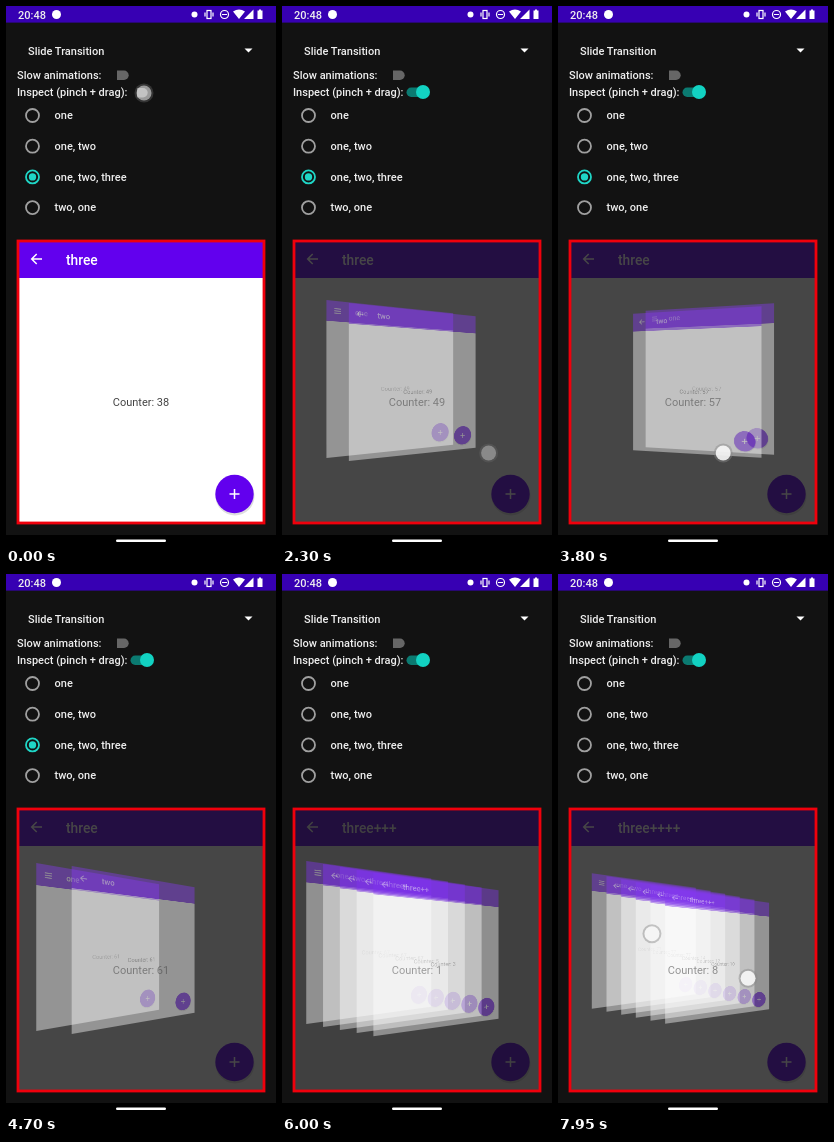
Recreate the animation shown at these times as an HTML page. Size 270x540 px, loop 8 s.

```html
<!DOCTYPE html>
<html lang="en">
<head>
<meta charset="utf-8">
<title>Slide Transition</title>
<style>
html, body { margin: 0; width: 100%; height: 100%; overflow: hidden; background: #121212; }
svg { position: absolute; left: 0; top: 0; font-family: Roboto, sans-serif; }
#clip { position: absolute; inset: 0; width: 270px; height: 540px; clip-path: inset(235px 12px 23px 12px); }
.screen { left: 12px; top: 235px; }
.ink { stroke: #fff; stroke-width: 1.5; fill: none; }
.title { fill: #fff; font-size: 13.75px; font-weight: 500; }
.count { font-size: 11px; text-anchor: middle; fill: #444; }
.label { font-size: 11px; font-weight: 500; fill: #eee; }
</style>
</head>
<body>
<svg id="chrome" width="270" height="540"></svg>
<div id="clip"></div>
<svg width="270" height="540">
  <rect x="12" y="235" width="246" height="282" fill="none" stroke="#f0000c" stroke-width="2.8"/>
  <g class="touch"><circle r="9.5" fill="#888" opacity=".45"/><circle r="7.5" fill="#fff" opacity=".85"/></g>
  <g class="touch"><circle r="9.5" fill="#888" opacity=".45"/><circle r="7.5" fill="#fff" opacity=".85"/></g>
</svg>
<script>
const LOOP = 8000, TICK = 205, W = 246, H = 282;
const OPEN = 250, OPEN_TIME = 550;
const PUSH = 4990, PUSH_GAP = 410, PUSH_TIME = 200, PUSH_COUNT = 4;
const PINCH = 6700, ZOOM = .525;
const DIM = .22, GHOST = .42;
const YAW = [[2300, 13.3], [3100, -29], [4650, 21.4], [5300, 17.5]];  // ms, degrees

const $ = s => document.querySelector(s);
const clamp = x => Math.min(1, Math.max(0, x));
const ramp = (t, a, b) => clamp((t - a) / (b - a));
const ease = x => x * x * (3 - 2 * x);
const easeOut = x => 1 - (1 - x) ** 2;
const mix = (a, b, k) => a + (b - a) * k;
const pushAt = i => PUSH + i * PUSH_GAP;

function yawAt(t) {
  return YAW.slice(1).reduce((yaw, [end, next], i) => mix(yaw, next, ease(ramp(t, YAW[i][0], end))), YAW[0][1]);
}

function addScreen(title, menu) {
  const icon = menu ? 'M13 14h11M13 18h11M13 22h11' : 'M24 18H14M18.7 13l-5 5 5 5';
  $('#clip').insertAdjacentHTML('beforeend', `<svg class="screen" width="${W}" height="${H}">
    <g class="body"><rect width="${W}" height="${H}" fill="#fff"/>
    <rect width="${W}" height="37" fill="#6200ee"/><path class="ink" d="${icon}"/>
    <text class="title" x="48" y="23.5">${title}</text>
    <circle cx="217" cy="255" r="19.5" fill="#000" opacity=".13"/>
    <circle cx="216.5" cy="253" r="19.2" fill="#6200ee"/>
    <path class="ink" d="M211.5 253h10M216.5 248v10"/></g>
    <text class="count" x="123" y="164.5"></text></svg>`);
  const el = $('#clip').lastElementChild;
  const [body, name, count] = ['.body', '.title', '.count'].map(s => el.querySelector(s));
  return { el, body, name, count };
}

const label = (x, y, s) => `<text class="label" x="${x}" y="${y}">${s}</text>`;
$('#chrome').innerHTML = `
  <rect width="270" height="16.600" fill="#3700b3"/>
  ${label(12, 12.5, '20:48')}
  <g fill="#fff"><circle cx="50.5" cy="8.5" r="4.5"/><circle cx="188.5" cy="8.5" r="3"/>
    <path d="M227 5.5q6-4 12 0l-6 7.5zM247.5 3.5v9.500h-9.500zM251.5 4.5h1.500v-1h2v1h1.500v8.500h-5z"/></g>
  <g fill="none" stroke="#fff" stroke-width="1.2"><rect x="201" y="4.5" width="4" height="8"/>
    <path d="M199 6.5v4M207 6.5v4M216 8.5h5"/><circle cx="218.5" cy="8.5" r="4"/></g>
  ${label(22, 48.5, 'Slide Transition')}
  <path d="M238.5 42.5h8l-4 4z" fill="#fff"/>
  ${label(11, 73, 'Slow animations:')}${label(11, 90, 'Inspect (pinch + drag):')}
  <path d="M111 64.5h7a4.7 4.7 0 0 1 0 9.4h-7z" fill="#666"/>
  <path id="off" d="M131 82h6a4.7 4.7 0 0 1 0 9.4h-6z" fill="#777"/>
  <g id="on"><rect x="124.5" y="81.5" width="20" height="9.5" rx="4.7" fill="#0b7a71"/>
    <circle id="thumb" cy="86" r="7" fill="#12d2c2"/></g>
  ${['one', 'one, two', 'one, two, three', 'two, one'].map((s, i) => {
    const y = 109.5 + 30.7 * i;
    return `<circle class="radio" cx="26.5" cy="${y}" r="6.5" fill="none" stroke="#a0a0a0" stroke-width="1.8"/>` +
      label(48.5, y + 3.8, s);
  }).join('')}
  <circle id="dot" cx="26.5" cy="170.9" r="3.7" fill="#1fd6c6"/>
  <rect y="529" width="270" height="11" fill="#000"/>
  <rect x="110" y="533.5" width="50" height="2.6" rx="1.3" fill="#fff"/>`;

const sheets = ['one', 'two', 'three', 'three+', 'three++', 'three+++'].map((s, i) => addScreen(s, !i));
const front = addScreen('three');
const touches = document.querySelectorAll('.touch');
const radio = document.querySelectorAll('.radio')[2];

// The first three screens count on from 38, each pushed one from 0
function countText(screen, t) {
  const [first, born] = screen < 3 ? [38, 0] : [0, pushAt(screen - 3)];
  return 'Counter: ' + (first + Math.max(0, Math.floor((t - born + 100) / TICK)));
}

// A sheet turns and shrinks from the full panel into its slot in the stack
function drawSheet(sheet, i, t, yaw, zoom, total) {
  const [start, time] = i < 2 ? [OPEN, OPEN_TIME] : [pushAt(i - 2), PUSH_TIME];
  const u = ramp(t, start, start + time);
  sheet.el.style.display = u > 0 ? '' : 'none';
  const shrink = easeOut(u), turn = easeOut(shrink);
  const slot = i - (total - 1) / 2;
  const spread = 390 / (total + 1) * Math.sin(yaw * Math.PI / 180);
  const x = (1 + slot * spread) * turn, y = slot * 3 * turn;
  const sx = mix(1, zoom, shrink), sy = sx * mix(1, .97, shrink);
  sheet.el.style.transform =
    `translate(${x}px,${y}px) scale(${sx},${sy}) perspective(310px) rotateY(${yaw * turn}deg)`;
  sheet.el.style.opacity = mix(DIM, GHOST, u);
  sheet.count.textContent = countText(i, t);
}

function drawFront(t, depth) {
  const dim = ease(ramp(t, OPEN, 700));
  const arrive = depth ? ramp(t - pushAt(depth - 1), PUSH_TIME * .6, PUSH_TIME) : 1;
  front.body.style.opacity = mix(1, DIM, dim) * arrive;
  front.count.style.opacity = mix(1, .55, dim) * arrive;
  front.name.textContent = 'three' + '+'.repeat(depth);
  front.count.textContent = countText(2 + depth, t);
}

function place(touch, x, y, alpha) {
  touch.setAttribute('transform', `translate(${x} ${y})`);
  touch.style.opacity = alpha;
}

function drawTouches(t, yaw, zoom) {
  const [a, b] = touches;
  const dx = 110 * zoom, dy = 51 * zoom, pinch = ramp(t, PINCH, PINCH + 50);
  place(b, 142 + dx, 382 + dy, pinch);
  const tap = (t - PUSH + 100) % PUSH_GAP - 100;
  if (t < 300) place(a, 138, 87, .65 * (1 - ramp(t, 150, 300)));
  else if (t < 4700) place(a, 180 + yaw * 2, 447, ramp(t, 2280, 2330) * (1 - ramp(t, 4600, 4700)));
  else if (t < pushAt(PUSH_COUNT)-100) place(a, 235, 487, .8 * ramp(tap, -100, -50) * (1 - ramp(tap, 0, 140)));
  else place(a, 142 - dx, 382 - dy, pinch);
}

function draw(t) {
  const yaw = yawAt(t);
  const zoom = ZOOM * mix(1, .832, ease(ramp(t, PINCH, 7950)));
  let depth = 0, total = 3;
  for (let i = 0; i < PUSH_COUNT; i++) {
    const since = t - pushAt(i);
    if (since >= 0) depth++;
    total += ease(ramp(since, PUSH_TIME / 2, PUSH_TIME));
  }
  sheets.forEach((s, i) => drawSheet(s, i, t, yaw, zoom, total));
  drawFront(t, depth);
  drawTouches(t, yaw, zoom);
  const on = ramp(t, 100, 250);
  $('#off').style.opacity = 1 - on;
  $('#on').style.opacity = on;
  $('#thumb').setAttribute('cx', mix(131, 141, ease(on)));
  radio.setAttribute('stroke', depth ? '#a0a0a0' : '#1fd6c6');
  $('#dot').style.opacity = depth ? 0 : 1;
}

const begin = performance.now();
function frame() {
  draw((performance.now() - begin) % LOOP);
  requestAnimationFrame(frame);
}
frame();
</script>
</body>
</html>
```
